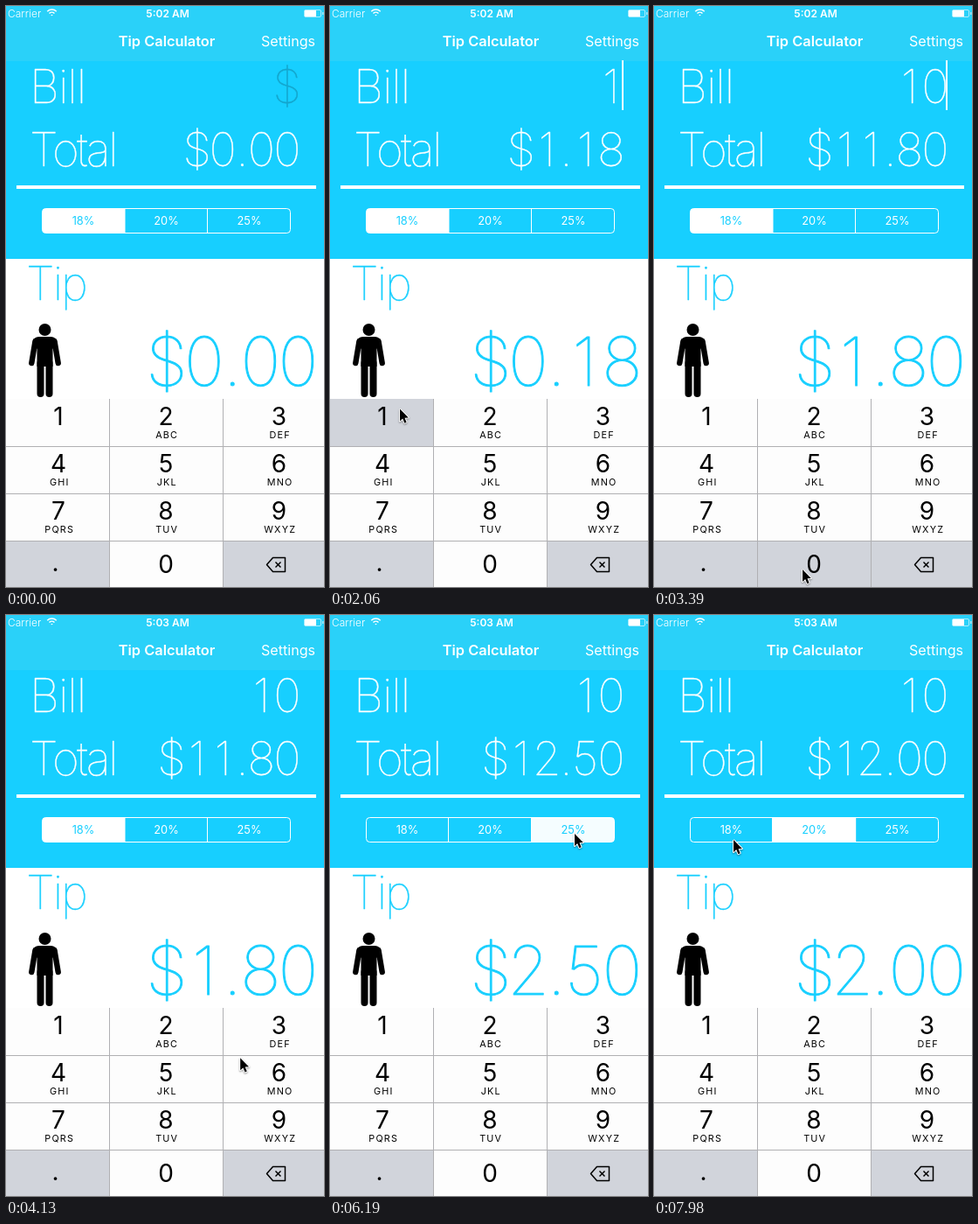
An HTML page with a canvas that plays this animation: 364x664 px, repeating every 8000 ms.

```html
<!DOCTYPE html>
<html lang="en">
<head>
<meta charset="utf-8">
<title>Tip Calculator</title>
<style>
  html, body { margin: 0; width: 100%; height: 100%; overflow: hidden; background: #fff; }
  canvas { display: block; }
</style>
</head>
<body>
<canvas id="stage" width="364" height="664"></canvas>
<script>
const ctx = document.getElementById('stage').getContext('2d');
const BLUE = '#17cfff', KEY_GRAY = '#d1d4db';
const LOOP = 8000, STEP = 147.2;

// Pointer path: time, x, y
const POINTER = [
  [700, 318, 300], [1178, 305, 342], [1472, 150, 478], [1620, 76, 500], [1910, 79, 460],
  [2510, 79, 458], [2810, 150, 628], [2960, 169, 643], [3690, 169, 643], [3980, 235, 560],
  [4420, 335, 390], [4860, 347, 248], [5005, 353, 240], [5152, 301, 236], [5450, 203, 244],
  [5900, 270, 250], [6050, 279, 249], [7080, 279, 249], [7530, 190, 248], [7820, 95, 257], [7950, 90, 256]
];

function pointerAt(t) {
  if (t < POINTER[0][0]) return null;
  const next = POINTER.findIndex(p => p[0] > t);
  if (next < 0) return POINTER.at(-1).slice(1);
  const [a, b] = [POINTER[next - 1], POINTER[next]];
  const k = (t - a[0]) / (b[0] - a[0]);
  return [1, 2].map(i => a[i] + (b[i] - a[i]) * k);
}

function caretOn(t) {
  if (t < 2060) return t >= 147 && (t + 440) % 1030 >= 520;
  if (t < 3230) return t < 2650;
  return t < 3825 || (t - 3825) % 1030 >= 510;
}

function rect(color, x, y, w, h) {
  ctx.fillStyle = color;
  ctx.fillRect(x, y, w, h);
}

function text(str, x, y, size, { weight = 400, color = '#fff', align = 'center', spacing = 0 } = {}) {
  ctx.font = `${weight} ${size}px Inter, sans-serif`;
  ctx.letterSpacing = spacing + 'px';
  ctx.textAlign = align;
  ctx.fillStyle = color;
  ctx.fillText(str, x, y);
}

// Thin lettering, slightly reinforced with an outline
function thin(str, x, y, size, color, line, align, spacing) {
  text(str, x, y, size, { weight: 100, color, align, spacing });
  ctx.strokeStyle = color;
  ctx.lineWidth = line;
  ctx.strokeText(str, x, y);
}

function label(str, left, y, color, spacing) {
  ctx.font = '100 53px Inter, sans-serif';
  ctx.textAlign = 'left';
  const x = left + ctx.measureText(str[0]).actualBoundingBoxLeft;
  thin(str, x, y, 53, color, 0.45, 'left', spacing);
}

// Right-aligned figures on equal cells, with a half cell for the point
function figures(str, right, y, size, color, line) {
  const cell = size * 0.555;
  let x = right;
  for (const ch of [...str].reverse()) {
    const w = ch === '.' ? cell / 2 : cell;
    thin(ch, x - w / 2, y, size, color, line, 'center', 0);
    x -= w;
  }
}

function line(points, width, color) {
  ctx.strokeStyle = color;
  ctx.lineWidth = width;
  ctx.beginPath();
  points.forEach(p => ctx.lineTo(...p));
  ctx.stroke();
}

function box(x, y, w, h, r) {
  ctx.beginPath();
  ctx.roundRect(x, y, w, h, r);
}

function header(t) {
  rect(BLUE, 0, 0, 364, 289);
  rect('#2ad1f9', 0, 0, 364, 63);
  text('Carrier', 2, 12.5, 12, { weight: 300, align: 'left' });
  text(t < 3530 ? '5:02 AM' : '5:03 AM', 185, 12.5, 12, { weight: 600 });
  ctx.strokeStyle = '#fff';
  ctx.lineWidth = 1.5;
  for (const r of [1, 4.2, 7.4]) {
    ctx.beginPath();
    ctx.arc(52.5, 11.5, r, -Math.PI * 0.75, -Math.PI * 0.25);
    ctx.stroke();
  }
  ctx.strokeStyle = '#ffffff99';
  ctx.lineWidth = 1;
  box(341.5, 4.5, 19, 8, 1.5);
  ctx.stroke();
  rect('#ffffff99', 362, 7, 1.5, 3);
  rect('#fff', 342, 5, 13, 7);
  text('Tip Calculator', 184, 46, 16.4, { weight: 600 });
  text('Settings', 354, 46, 16.1, { align: 'right' });
}

function segments(selected) {
  ctx.save();
  box(41.5, 231.5, 284, 28, 4);
  ctx.clip();
  rect(selected === 2 ? '#f5fdff' : '#fff', 41 + selected * 94.7, 231, 95.5, 30);
  ctx.restore();
  ctx.strokeStyle = '#fff';
  ctx.lineWidth = 1;
  box(41.5, 231.5, 284, 28, 4);
  ctx.stroke();
  rect('#fff', 135, 231, 1, 29);
  rect('#fff', 230, 231, 1, 29);
  ['18%', '20%', '25%'].forEach((s, i) =>
    text(s, 88.5 + i * 95, 250, 12.8, { color: i === selected ? BLUE : '#fff' }));
}

function person() {
  ctx.fillStyle = '#000';
  ctx.lineCap = 'round';
  ctx.beginPath();
  ctx.arc(44.5, 370, 7, 0, 7);
  ctx.fill();
  box(30.5, 378, 28, 14, 7);
  ctx.fill();
  rect('#000', 35.5, 380, 18, 32);
  for (const side of [-1, 1]) {
    line([[44.5 + side * 11, 383], [44.5 + side * 15.2, 408]], 6.4, '#000');
    line([[44.5 + side * 5, 408], [44.5 + side * 5, 443]], 8, '#000');
  }
  ctx.lineCap = 'butt';
}

function keypad(pressed) {
  const letters = ['', 'ABC', 'DEF', 'GHI', 'JKL', 'MNO', 'PQRS', 'TUV', 'WXYZ'];
  const black = { color: '#000' };
  rect('#fdfdfd', 0, 449, 364, 215);
  rect(KEY_GRAY, 0, 611, 118, 53);
  rect(KEY_GRAY, 249, 611, 115, 53);
  if (pressed === 1) rect(KEY_GRAY, 0, 449, 118, 54);
  if (pressed === 0) rect(KEY_GRAY, 118, 611, 131, 53);
  for (const x of [118, 248]) rect('#b0b0b3', x, 449, 1, 215);
  for (const y of [503, 557, 611]) rect('#b0b0b3', 0, y, 364, 1);
  letters.forEach((s, i) => {
    const x = [60, 183, 312.5][i % 3], y = 479 + 54 * Math.floor(i / 3);
    text(i + 1, x, y, 28, black);
    text(s, x + 1.2, y + 15, 10.8, { color: '#000', spacing: 1.2 });
  });
  text('.', 56.5, 646, 28, black);
  text('0', 183, 648, 28, black);
  ctx.lineJoin = 'round';
  line([[298.5, 638.5], [305.5, 630.5], [319.5, 630.5], [319.5, 646.5], [305.5, 646.5],
    [298.5, 638.5], [305.5, 630.5]], 1.5, '#000');
  line([[308.5, 635.5], [314.5, 641.5]], 1.5, '#000');
  line([[314.5, 635.5], [308.5, 641.5]], 1.5, '#000');
}

function pointer([x, y]) {
  ctx.save();
  ctx.translate(x + 1, y + 1);
  ctx.shadowColor = '#0006';
  ctx.shadowBlur = 2;
  ctx.shadowOffsetY = 1;
  const outline = [[0, 0], [0, 14], [3.2, 11.1], [5.4, 16.2], [7.6, 15.2], [5.5, 10.3], [9.8, 10], [0, 0]];
  line(outline, 2, '#fff');
  ctx.shadowColor = 'transparent';
  ctx.fillStyle = '#000';
  ctx.fill();
  ctx.restore();
}

function draw(now) {
  const t = Math.floor(now % LOOP / STEP) * STEP;
  const bill = t < 2060 ? 0 : t < 3230 ? 1 : 10;
  const selected = t < 6180 ? 0 : t < 7510 ? 2 : 1;
  const tip = bill * [0.18, 0.2, 0.25][selected];
  const pressed = t >= 1910 && t < 2350 ? 1 : t >= 3080 && t < 3530 ? 0 : null;

  rect('#fff', 0, 0, 364, 664);
  header(t);
  label('Bill', 33, 111, '#fff', -1);
  label('Total', 30, 183, '#fff', -2.6);
  figures(bill ? String(bill) : '$', 336.5, 111, 53, bill ? '#fff' : '#14a6cd', 0.45);
  figures('$' + (bill + tip).toFixed(2), 336.5, 183, 53, '#fff', 0.45);
  rect('#fff', 12, 205, 343, 4);
  segments(selected);
  label('Tip', 26, 336, BLUE, -2);
  person();
  figures('$' + tip.toFixed(2), 356, 434, 77.5, BLUE, 1);
  keypad(pressed);
  if (caretOn(t)) rect('#fff', 334, 62, 2, 57);
  const at = pointerAt(t);
  if (at) pointer(at);
  requestAnimationFrame(() => draw(performance.now()));
}

draw(performance.now());
</script>
</body>
</html>
```
